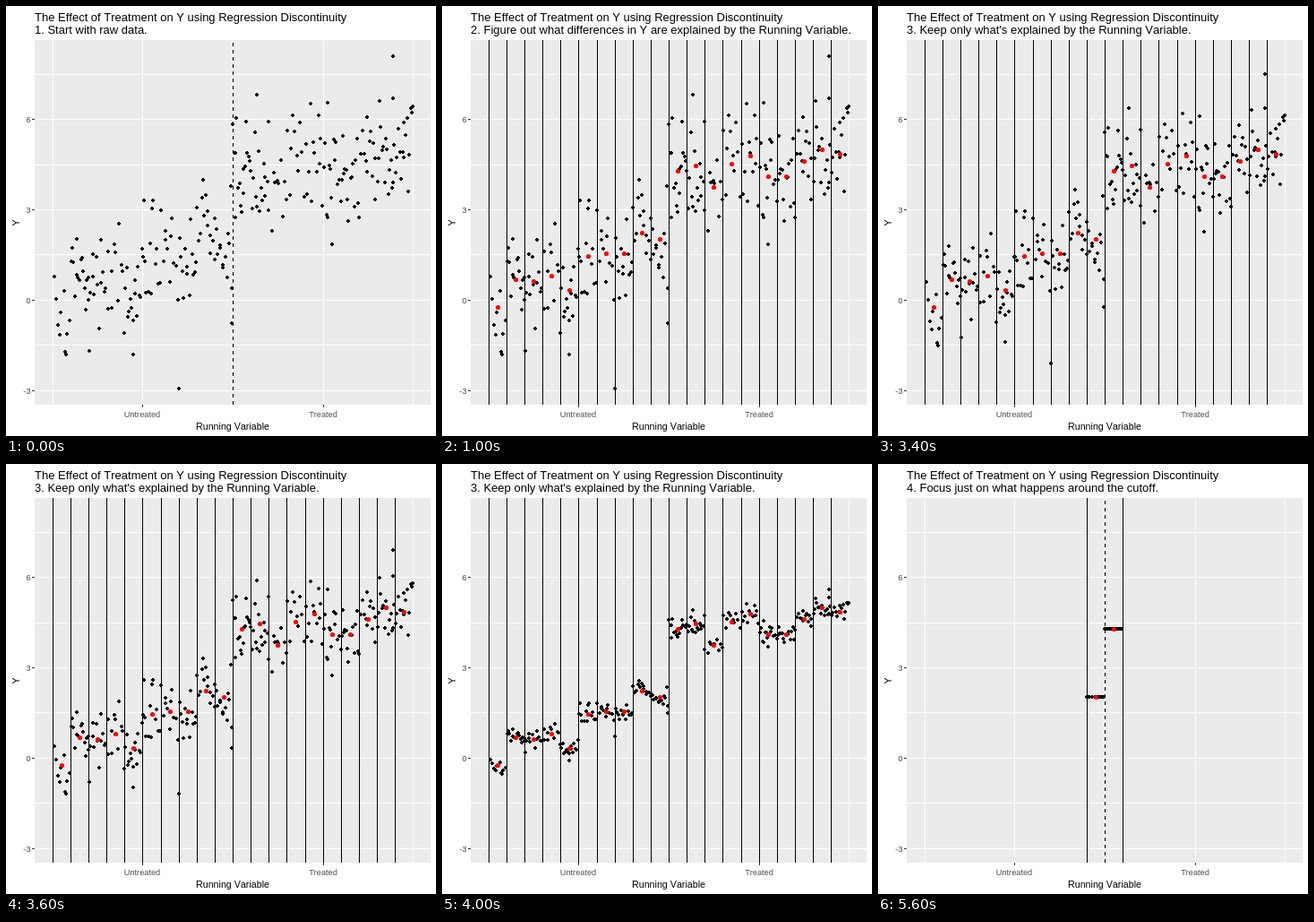
An HTML page with a canvas for the animation above (8000 ms loop, 480 by 480 pixels).

```html
<!DOCTYPE html>
<html lang="en">
<head>
<meta charset="utf-8">
<title>Regression Discontinuity</title>
<style>
html, body { margin: 0; width: 480px; height: 480px; overflow: hidden; background: #fff; }
canvas { display: block; }
</style>
</head>
<body>
<canvas id="stage" width="480" height="480"></canvas>
<script>
const ctx = document.getElementById('stage').getContext('2d');
const LOOP = 8000, LEFT = 51.85, STEP = 20.12, TOP = 38, BOTTOM = 445;

const titles = [
  '1. Start with raw data.',
  '2. Figure out what differences in Y are explained by the Running Variable.',
  "3. Keep only what's explained by the Running Variable.",
  '4. Focus just on what happens around the cutoff.'
];

// Height of each bin's mean
const means = [336, 305, 307, 301, 317, 279, 276, 276, 253, 260,
               184, 178, 202, 176, 167, 190, 190, 173, 160, 165];

// The few points that stand apart from the cloud
const outliers = [
  [67, 389], [93, 385], [142, 389], [154, 217], [193, 427], [252, 354],
  [256, 236], [280, 99], [359, 108], [364, 266], [432, 56], [432, 103], [454, 112]
];

let seed = 7;
function random() {
  seed = (seed * 16807) % 2147483647;
  return seed / 2147483647;
}

const edge = k => Math.round(LEFT + STEP * k);
const gridY = i => Math.round(75.8 + 50.4 * i);

const points = outliers.map(([x, y]) => ({ x, y, bin: Math.floor((x - LEFT) / STEP) }));
means.forEach((mean, bin) => {
  const n = 9 + Math.floor(random() * 7);
  for (let i = 0; i < n; i++) {
    const x = Math.round(LEFT + STEP * (bin + (i + random()) / n));
    points.push({ x, y: mean + (random() + random() - 1) * 68, bin });
  }
});

function text(str, x, y, size, color = '#000', align = 'left') {
  ctx.font = `${size}px "Liberation Sans", Arial, sans-serif`;
  ctx.fillStyle = color;
  ctx.textAlign = align;
  ctx.fillText(str, x, y);
}

function rect(x, y, w, h, color) {
  ctx.fillStyle = color;
  ctx.fillRect(x, y, w, h);
}

// Crisp four-pixel dot
function dataDot(x, y) {
  rect(x - 1, y - 2, 2, 4, '#000');
  rect(x - 2, y - 1, 4, 2, '#000');
}

function meanDot(x, y) {
  ctx.fillStyle = '#f00';
  ctx.beginPath();
  ctx.arc(x + 0.5, y + 0.5, 2.6, 0, 2 * Math.PI);
  ctx.fill();
}

function binLine(k) {
  rect(edge(k), TOP, 1, BOTTOM - TOP, '#000');
}

function dashedLine() {
  for (let y = BOTTOM; y > TOP; y -= 8) {
    const top = Math.max(TOP, y - 4);
    rect(edge(10), top, 1, y - top, '#000');
  }
}

function drawAxes(title) {
  rect(0, 0, 480, 480, '#fff');
  rect(32, TOP, 442, BOTTOM - TOP, '#ebebeb');
  for (let k = 0; k <= 20; k += 5) rect(edge(k), TOP, 1, BOTTOM - TOP, '#fff');
  for (let i = 0; i < 8; i++) rect(32, gridY(i), 442, 1, '#fff');

  text('The Effect of Treatment on Y using Regression Discontinuity', 32, 17, 13);
  text(title, 32, 31, 13);
  [6, 3, 0, -3].forEach((value, i) => {
    const y = gridY(2 * i + 1);
    rect(29, y, 3, 1, '#333');
    text(value, 27.5, y + 4, 9.2, '#4d4d4d', 'right');
  });
  ['Untreated', 'Treated'].forEach((label, i) => {
    const x = edge(5 + 10 * i);
    rect(x, BOTTOM, 1, 3, '#333');
    text(label, x, 459, 9.2, '#4d4d4d', 'center');
  });
  text('Running Variable', 253, 473, 10.7, '#000', 'center');
  ctx.save();
  ctx.translate(15, 242);
  ctx.rotate(-Math.PI / 2);
  text('Y', 0, 0, 10.7, '#000', 'center');
  ctx.restore();
}

function draw(t) {
  const stage = t < 500 ? 0 : t < 3100 ? 1 : t < 5600 ? 2 : 3;
  const binned = t >= 1000, focus = stage === 3;
  const u = Math.min(1, Math.max(0, (Math.floor(t / 100) - 30) / 14));
  const pull = (1 - Math.cos(Math.PI * u)) / 2;
  const shown = bin => !focus || bin === 9 || bin === 10;

  drawAxes(titles[stage]);
  for (const { x, y, bin } of points) {
    if (shown(bin)) dataDot(x, Math.round(y + (means[bin] - y) * pull));
  }
  if (focus) {
    binLine(9);
    binLine(11);
  } else if (binned) {
    means.forEach((_, k) => binLine(k));
  }
  if (!binned || focus) dashedLine();
  if (binned) {
    means.forEach((y, k) => {
      if (shown(k)) meanDot(Math.round(LEFT + STEP * (k + 0.5)), y);
    });
  }
}

ctx.fontKerning = 'none';
const start = performance.now();
function frame() {
  draw((performance.now() - start) % LOOP);
  requestAnimationFrame(frame);
}
frame();
</script>
</body>
</html>
```
